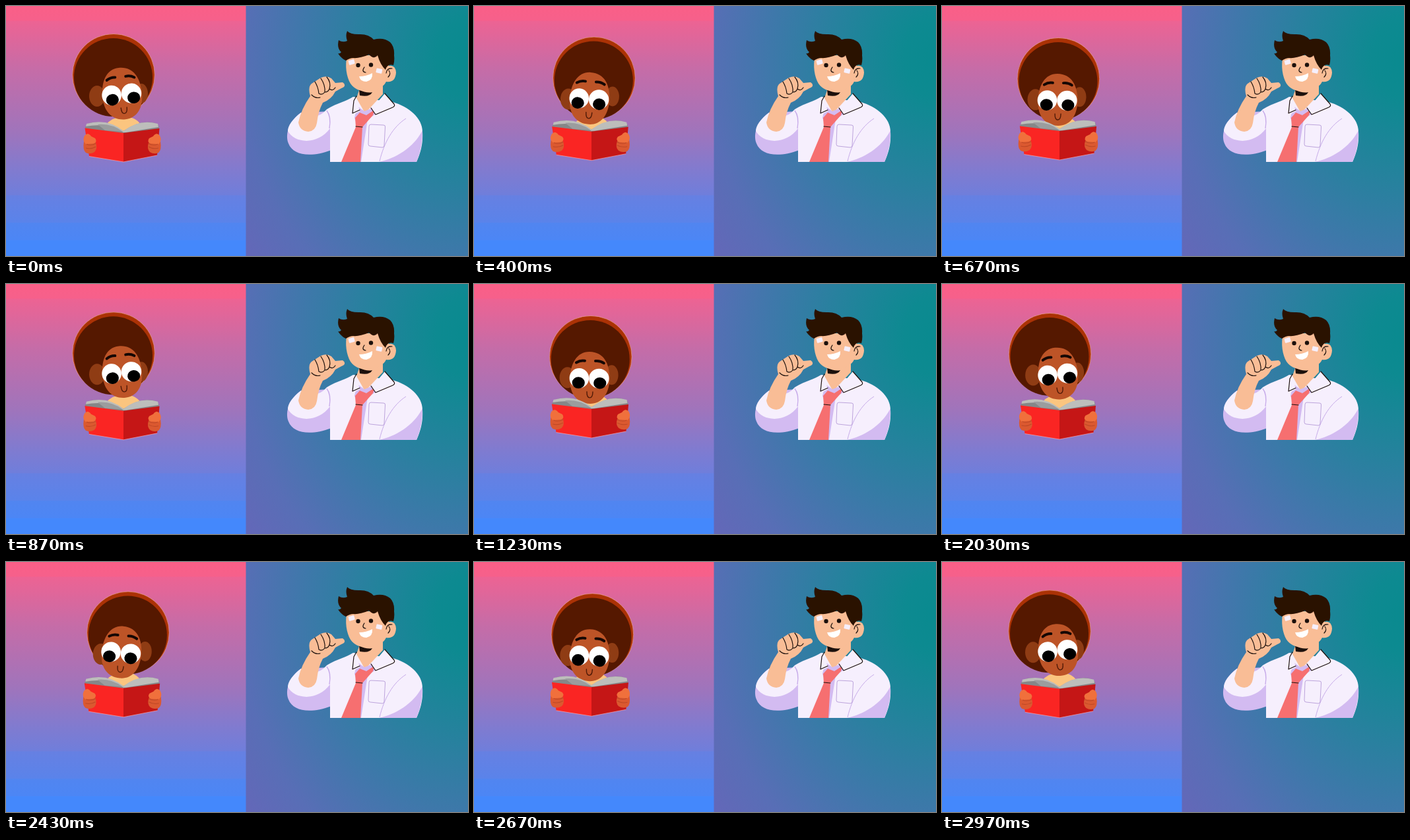
An HTML page that plays this animation: 700 by 380 pixels, repeating every 3.01 s.

```html
<!DOCTYPE html>
<html lang="en">
<head>
<meta charset="utf-8">
<title>Reader and colleague</title>
<style>
html, body { margin: 0; width: 100%; height: 100%; overflow: hidden; }
svg { display: block; }
.thin { fill: none; stroke: #1c100c; stroke-width: 1.2; stroke-linecap: round; stroke-linejoin: round; }
</style>
</head>
<body>
<svg width="700" height="380" viewBox="0 0 700 380">
  <defs>
    <linearGradient id="dusk" x2="0" y2="1">
      <stop offset="0" stop-color="#fa5f87"/>
      <stop offset=".058" stop-color="#f6608b"/>
      <stop offset=".06" stop-color="#ed6393"/>
      <stop offset=".25" stop-color="#c66ca7"/>
      <stop offset=".5" stop-color="#a074bb"/>
      <stop offset=".64" stop-color="#847acd"/>
      <stop offset=".756" stop-color="#6f7edb"/>
      <stop offset=".758" stop-color="#6680e2"/>
      <stop offset=".866" stop-color="#5a83ea"/>
      <stop offset=".868" stop-color="#5185f0"/>
      <stop offset=".936" stop-color="#4c86f5"/>
      <stop offset=".938" stop-color="#4488fc"/>
    </linearGradient>
    <radialGradient id="sea" gradientUnits="userSpaceOnUse" cx="0" cy="0" r="1" gradientTransform="translate(705 80) scale(440 520)">
      <stop offset="0" stop-color="#098a8f"/>
      <stop offset=".12" stop-color="#0d8a91"/>
      <stop offset=".35" stop-color="#25829d"/>
      <stop offset=".58" stop-color="#3e78aa"/>
      <stop offset=".8" stop-color="#586eb6"/>
      <stop offset="1" stop-color="#6666b9"/>
    </radialGradient>
  </defs>
  <rect width="364" height="380" fill="url(#dusk)"/>
  <rect x="363.500" width="337" height="380" fill="url(#sea)"/>

  <!-- reader -->
  <g id="hair">
    <circle cx="163" cy="104.800" r="62.300" fill="#ab3205" stroke="#efb0a0" stroke-width=".6"/>
    <circle cx="162.500" cy="108.500" r="59.500" fill="#551800"/>
  </g>
  <g id="ears" fill="#8f3c14">
    <ellipse cx="138" cy="137" rx="12" ry="16"/>
    <ellipse cx="205" cy="133" rx="10" ry="15"/>
  </g>
  <path id="neck" fill="#fbc57f" d="M151 181Q160 169 178 168Q196 168 204 180L179 192Z"/>
  <g id="face">
    <path fill="#bd5427" d="M175 95C196 95 206 112 206 136C206 160 194 174 177 174C158 174 146 160 146 138C146 113 156 95 175 95Z"/>
    <g fill="#fff">
      <ellipse cx="160" cy="135.5" rx="14.8" ry="15"/>
      <ellipse cx="190" cy="135.5" rx="15.2" ry="15"/>
    </g>
    <g id="pupils">
      <ellipse cx="160.5" cy="142.5" rx="9.6" ry="8.8"/>
      <ellipse cx="193" cy="142.5" rx="9.6" ry="8.8"/>
    </g>
    <path fill="none" stroke="#150704" stroke-width="4" stroke-linecap="round" d="M155 112Q161 108 168 109M184 109Q191 108 197 112"/>
    <path fill="none" stroke="#4f1a08" stroke-width="1.4" stroke-linecap="round" d="M172 156Q172 165 176.500 165Q181 165 181 156"/>
  </g>
  <g id="book">
    <path fill="#858788" d="M120 187Q119 180 130 177Q156 174 178 190Q201 174 222 177Q233 179 232 187L178 194Z"/>
    <path fill="#bdbebb" d="M122 179Q154 170 178 190Q202 171 230 179L231 184L182 192H178Q153 177 121 183Z"/>
    <path fill="#9b9d9e" d="M139 180Q160 178 177 191L150 189Z"/>
    <path fill="#fa2523" d="M119.500 185.500L178 193V237L126 228.500Z"/>
    <path fill="#c51616" d="M178 193L232.500 186L229 227L178 237Z"/>
    <path fill="none" stroke="#f3a3b0" stroke-width=".7" d="M126 228.500L178 237L229 227"/>
    <g id="hand">
      <path fill="#db5930" d="M118 206Q116 219 121 223Q128 226 134 222Q139 217 136 208L129 201Z"/>
      <path fill="#f0703c" d="M119 197Q124 191 129 198L135 201Q139 206 133 209L121 210Q115 205 119 197Z"/>
      <path fill="none" stroke="#bd4826" d="M122 210Q129 213 136 209M121 216Q129 218 136 214"/>
    </g>
    <use href="#hand" transform="matrix(-1 0 0 1 352 0)"/>
  </g>

  <!-- colleague -->
  <path fill="#d3bbf1" d="M447 162C430 174 422 194 428 209C435 227 461 231 493 219V160Z"/>
  <path fill="#f6effd" d="M447 162C434 172 427 182 427 190C437 209 472 212 491 186V237H622C629 221 632 208 631 191C631 170 610 153 586 146L526 138C513 146 498 149 486 157Q470 176 447 162Z"/>
  <path fill="#d3bbf1" d="M565 237C590 232 618 215 631 189Q632 212 622 237Z"/>
  <path fill="none" stroke="#c7abe9" stroke-width="1" d="M606 171C586 184 573 207 566 236"/>
  <path fill="none" stroke="#bda4dc" stroke-width="1" d="M553 180L572 181Q575 181 574.500 184L573 212Q573 215 570 215L552 213Q549 213 549 210L550 183Q550 180 553 180Z"/>
  <path fill="none" stroke="#c7abe9" stroke-width="1.400" d="M486 159Q493 168 490 186"/>
  <path fill="#f9bd96" d="M461 137Q457 123 463 118L477 109Q486 105 493 110L499 117L510 116Q515 119 512 123L499 130Q493 142 480 147Q473 160 471 178Q469 190 458 191Q445 190 443 177Q447 157 461 137Z"/>
  <path class="thin" d="M468 115Q473 123 474 133M477 110Q484 120 483 131M486 108Q493 116 490 126M474 133Q479 136 483 131Q488 131 490 126Q495 130 499 124M463 135Q469 141 476 139"/>
  <path fill="#f9bd96" d="M537 122L571 120V134L544 163L531 140Z"/>
  <path fill="#1c100c" d="M535 127Q546 133 555 131Q551 139 536 136Z"/>
  <path fill="#d3bbf1" d="M532 152L543 160L558 154L562 163L548 172L538 237H531L533 185L528 170Z"/>
  <path fill="#f66f70" d="M536 162L546 166L558 158L556 166L540 184L537 237H508L530 184L529 170Z"/>
  <path class="thin" d="M530 183L540 184"/>
  <path fill="#f6effd" d="M530 138L536 160L526 165L527 145ZM574 133L588 149Q590 152 586 154L560 165L554 157Z"/>
  <path class="thin" d="M531 137L527 144L525 163L536 158M574 133L588 149Q590 152 586 154L560 165L553 155"/>
  <path fill="#f9bd96" d="M517 75C513 91 516 108 522 118Q531 131 551 130Q570 127 576 115Q590 117 591 101Q590 89 580 91L576 75Z"/>
  <path fill="#2a1200" d="M515 83Q508 80 503 72Q506 73 508 70Q501 64 504 52Q510 56 517 53Q514 45 517 38Q521 43 534 43Q549 42 557 51Q572 47 582 55Q589 62 588 75Q589 83 587 90Q578 87 575 97Q567 89 563 75Q558 82 550 74Q535 80 526 79Q521 79 515 83Z"/>
  <path class="thin" d="M585 95Q577 94 576 102M580 98Q584 103 579 108M543 93Q538 100 545 101"/>
  <g fill="#1c100c"><circle cx="533.500" cy="90" r="3.200"/><circle cx="553" cy="89.500" r="3.200"/></g>
  <path fill="#fff" d="M535 107Q546 107 555 102Q556 113 546 115Q537 115 535 107Z"/>
  <g fill="#f6effd">
    <rect x="519" y="82" width="9" height="7" rx="1" transform="rotate(-15 523 85)"/>
    <rect x="561" y="95" width="9" height="7" rx="1" transform="rotate(12 565 98)"/>
  </g>
</svg>
<script>
const LOOP = 3010;
// [ms, swing cycles]: the sway runs at a slightly uneven pace
const PACE = [[0, 0], [70, .01], [400, .36], [870, .99], [1600, 1.58], [2030, 2.05], [2430, 2.43], [2970, 2.99], [LOOP, 3]];
const part = id => document.getElementById(id);
const move = (id, x, y, extra = '') => part(id).setAttribute('transform', `translate(${x} ${y}) ${extra}`);

function cycles(t) {
  const i = PACE.findIndex(([end]) => end > t);
  const [t0, p0] = PACE[i - 1], [t1, p1] = PACE[i];
  return p0 + (p1 - p0) * (t - t0) / (t1 - t0);
}

function draw(t) {
  const angle = 2 * Math.PI * cycles(t);
  const side = (1 - Math.cos(angle)) / 2;          // 0 left, 1 right
  const dip = 1.2 * Math.abs(Math.sin(angle));     // head down, book up
  move('hair', 23 * side, 5 * dip);
  move('ears', 6 * side, 4 * dip + side);
  move('face', 1 - 3 * side, 8 * dip - 1.5, `rotate(${-6 + 12 * side} 176 145)`);
  move('pupils', -2.5 * side, 0);
  move('neck', 0, -dip);
  move('book', 178 - 178 * (1 + .025 * dip), -2.5 * dip, `scale(${1 + .025 * dip} 1)`);
}

const start = performance.now();
function tick() {
  draw((performance.now() - start) % LOOP);
  requestAnimationFrame(tick);
}
tick();
</script>
</body>
</html>
```
